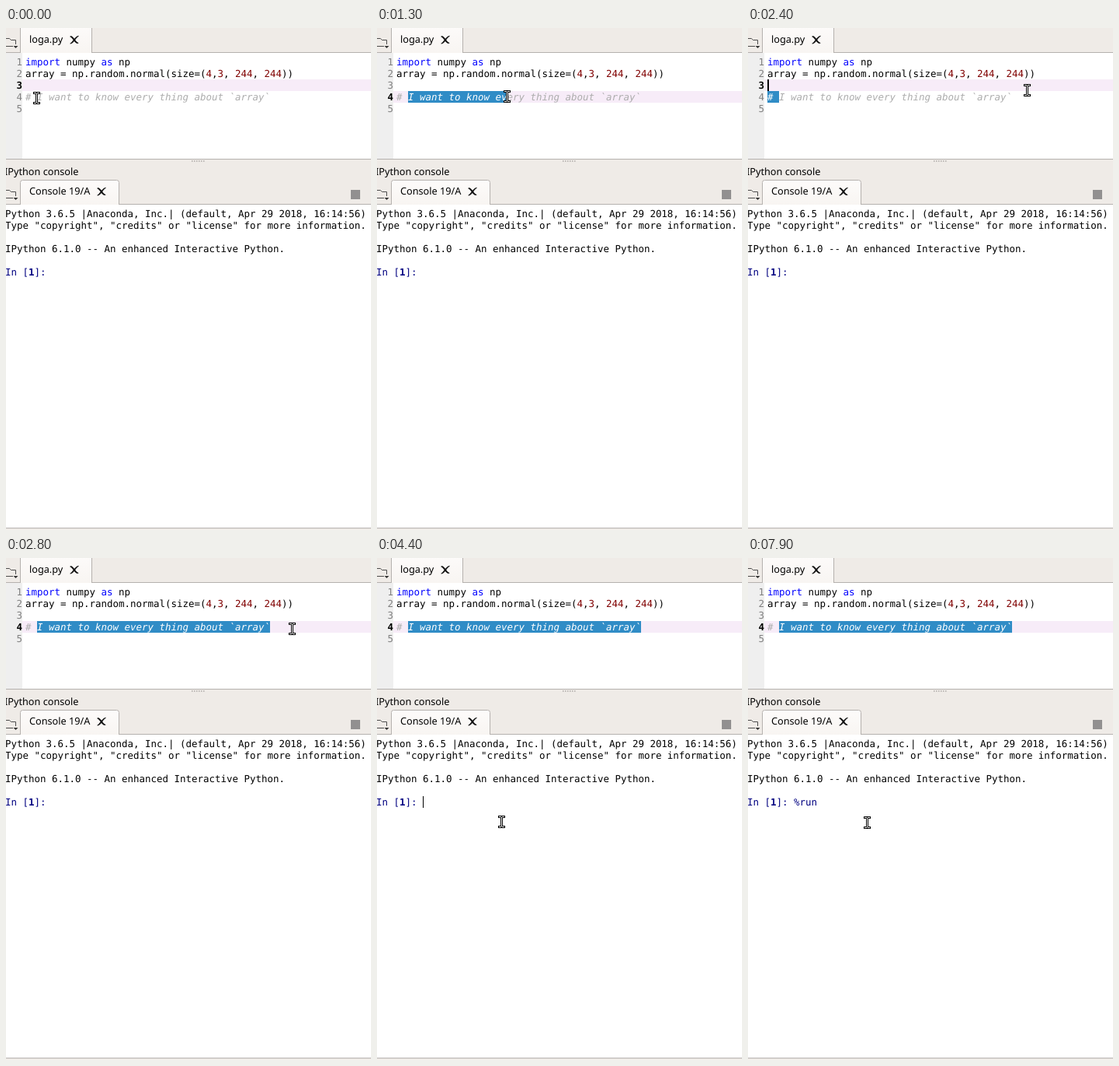
An HTML page for the animation above (8000 ms loop, 470 by 645 pixels).

```html
<!DOCTYPE html>
<html lang="en">
<head>
<meta charset="utf-8">
<title>Editor and console</title>
<style>
  html, body { margin: 0; width: 100%; height: 100%; overflow: hidden; background: #efebe7; }
  svg { display: block; }
  text { white-space: pre; text-rendering: geometricPrecision; }
  .ui { font: 12.7px "Noto Sans", sans-serif; }
  .code { font: 12.46px "DejaVu Sans Mono", monospace; }
  .kw { fill: #00f; }
  .num { fill: #800000; }
  .note { font-style: italic; fill: #adadad; }
  .gutter text { fill: #808080; }
  .gutter .on { fill: #000; font-weight: bold; }
  .prompt { fill: #000080; }
  .edge { fill: none; stroke: #b5b1ae; }
</style>
</head>
<body>
<svg width="470" height="645" viewBox="0 0 470 645">
  <defs>
    <linearGradient id="tabFill" x2="0" y2="1">
      <stop offset="0" stop-color="#fdfbfa"/>
      <stop offset="1" stop-color="#f8f5f2"/>
    </linearGradient>
    <g id="folder" fill="none" stroke="#4c4c4c">
      <path d="M-1 .5H4.5L6.5 2.5H12.5V8M9 10.5H-1"/>
      <path d="M9.5 10H15.5L12.5 13Z" fill="#333" stroke="none"/>
    </g>
    <path id="close" d="M-5.5-4.5C-3.5-5.5-2.5-4.5 0-1.2 2-3.6 3.5-5 5.5-5.3L5.7-4.6C4-3.5 2.6-2 1.2.3 2.6 2.4 3.8 3.6 5.7 4.2 4 5.6 2.4 5-.2 2-2 4.2-3.5 5.3-5.3 5.4L-5.6 4.7C-4 3.7-2.8 2.3-1.4.4-2.8-1.6-3.8-3-5.5-3.6Z" fill="#111"/>
    <clipPath id="selClip"><rect id="clipBox" y="81" height="15"/></clipPath>
  </defs>

  <rect width="470" height="645" fill="#efebe7"/>

  <!-- editor pane -->
  <path class="edge" d="M0 31.5H470"/>
  <path d="M18.5 32V-3H107.5Q110.5-3 110.5 0V32" fill="url(#tabFill)" stroke="#b5b1ae"/>
  <use href="#folder" x="0" y="13"/>
  <text class="ui" x="30" y="19">loga.py</text>
  <use href="#close" x="88" y="15"/>
  <rect y="32" width="470" height="136" fill="#fff"/>
  <rect y="32" width="21" height="136" fill="#efefef"/>
  <path class="edge" d="M0 168.5H470"/>
  <path d="M239 171H256" stroke="#bcb8b5" stroke-width="2" stroke-dasharray="1.5 1.5"/>

  <rect id="row" x="21" width="449" height="15" fill="#f7ecf8"/>
  <g class="code gutter" id="gutter"></g>
  <g class="code">
    <text x="25" y="48"><tspan class="kw">import</tspan> numpy <tspan class="kw">as</tspan> np</text>
    <text x="25" y="63">array = np.random.normal(size=(<tspan class="num">4</tspan>,<tspan class="num">3</tspan>, <tspan class="num">244</tspan>, <tspan class="num">244</tspan>))</text>
    <text class="note" x="25" y="93"># I want to know every thing about `array`</text>
    <rect id="sel" y="81" height="15" fill="#308cc6"/>
    <g clip-path="url(#selClip)">
      <text class="note" style="fill:#fff" x="25" y="93"># I want to know every thing about `array`</text>
    </g>
  </g>
  <rect id="caret" x="25" y="66" width="2" height="15"/>

  <!-- console pane -->
  <text class="ui" x="-2" y="189">IPython console</text>
  <path class="edge" d="M0 226.5H470"/>
  <path d="M18.5 227V198.5Q18.5 195.5 21.5 195.5H142.5Q145.5 195.5 145.5 198.5V227" fill="url(#tabFill)" stroke="#b5b1ae"/>
  <use href="#folder" x="0" y="208"/>
  <text class="ui" x="30" y="214">Console 19/A</text>
  <use href="#close" x="123" y="210"/>
  <rect x="444" y="208" width="12" height="12" fill="#929090"/>
  <rect y="227" width="470" height="415" fill="#fff"/>
  <path class="edge" d="M0 642.5H470"/>
  <g class="code">
    <text x="-1" y="243">Python 3.6.5 |Anaconda, Inc.| (default, Apr 29 2018, 16:14:56)</text>
    <text x="-1" y="258">Type "copyright", "credits" or "license" for more information.</text>
    <text x="-1" y="288">IPython 6.1.0 -- An enhanced Interactive Python.</text>
    <text class="prompt" x="-1" y="318">In [<tspan font-weight="bold">1</tspan>]:</text>
    <text class="prompt" id="typed" x="59" y="318"></text>
  </g>
  <rect id="prompt" y="306" width="1" height="15"/>

  <g id="pointer">
    <path d="M-4-8H5V-5H2V5H5V8H-4V5H-1V-5H-4Z"/>
    <path d="M-3-7H0V-6H1V-7H4V-6H1V6H4V7H1V6H0V7H-3V6H0V-6H-3Z" fill="#fff"/>
  </g>
</svg>

<script>
const LOOP = 8000, STEP = 100, COL = 7.5, LEFT = 25;
const $ = id => document.getElementById(id);
const set = (id, attrs) => {
  for (const k in attrs) $(id).setAttribute(k, attrs[k]);
};

// pointer path: time, x, y
const path = [
  [0, 39, 90], [300, 39, 90], [400, 40, 91], [600, 46, 93], [800, 75, 97],
  [1000, 115, 94], [1300, 167, 88], [1700, 265, 86], [2000, 340, 82],
  [2100, 351, 80], [2200, 357, 80], [2300, 357, 80], [2400, 359, 80],
  [2700, 359, 80], [2800, 368, 91], [3100, 368, 91], [3200, 362, 97],
  [3500, 264, 228], [3800, 166, 334], [3900, 160, 339], [4600, 160, 339],
  [4700, 153, 340], [LOOP, 153, 340]
];

// console input: time, text, caret shown
const typing = [
  [0, "", 0], [4400, "", 1], [4900, "", 0], [5400, "", 1], [5500, "%", 1],
  [5900, "%", 0], [6000, "%r", 1], [6300, "%ru", 1], [6400, "%ru", 0],
  [6500, "%run", 1], [6600, "%run ", 1], [6900, "%run ", 0],
  [7400, "%run ", 1], [7900, "%run ", 0]
];

function pointerAt(t) {
  const i = path.findIndex(p => p[0] > t);
  const [t0, x0, y0] = path[i - 1], [t1, x1, y1] = path[i];
  const k = (t - t0) / (t1 - t0);
  return [Math.round(x0 + (x1 - x0) * k), Math.round(y0 + (y1 - y0) * k)];
}

const numbers = [1, 2, 3, 4, 5].map(n => {
  const el = document.createElementNS("http://www.w3.org/2000/svg", "text");
  el.setAttribute("x", 13.5);
  el.setAttribute("y", 33 + n * 15);
  el.textContent = n;
  return $("gutter").appendChild(el);
});

function drawEditor(t) {
  // the button is held from 500 ms and released after 3100 ms
  const [x, y] = pointerAt(Math.min(t, 3100));
  const held = t >= 500;
  const line = held && y > 81 ? 4 : 3;
  const col = Math.max(2, Math.min(42, Math.round((x - LEFT) / COL)));
  const [from, to] = !held ? [2, 2] : line === 3 ? [0, 2] : [2, col];
  const box = { x: LEFT + from * COL, width: (to - from) * COL };
  set("row", { y: 21 + line * 15 });
  set("sel", box);
  set("clipBox", box);
  set("caret", { opacity: t >= 2400 && t < 2800 ? 1 : 0 });
  numbers.forEach((el, i) => el.classList.toggle("on", i + 1 === line));
}

function drawConsole(t) {
  const [, text, shown] = typing.filter(s => s[0] <= t).pop();
  $("typed").textContent = text;
  set("prompt", { x: Math.round(59 + text.length * COL), opacity: shown });
}

function draw() {
  const t = Math.floor(performance.now() % LOOP / STEP) * STEP;
  const [x, y] = pointerAt(t);
  drawEditor(t);
  drawConsole(t);
  set("pointer", { transform: `translate(${x} ${y})` });
  requestAnimationFrame(draw);
}
draw();
</script>
</body>
</html>
```
